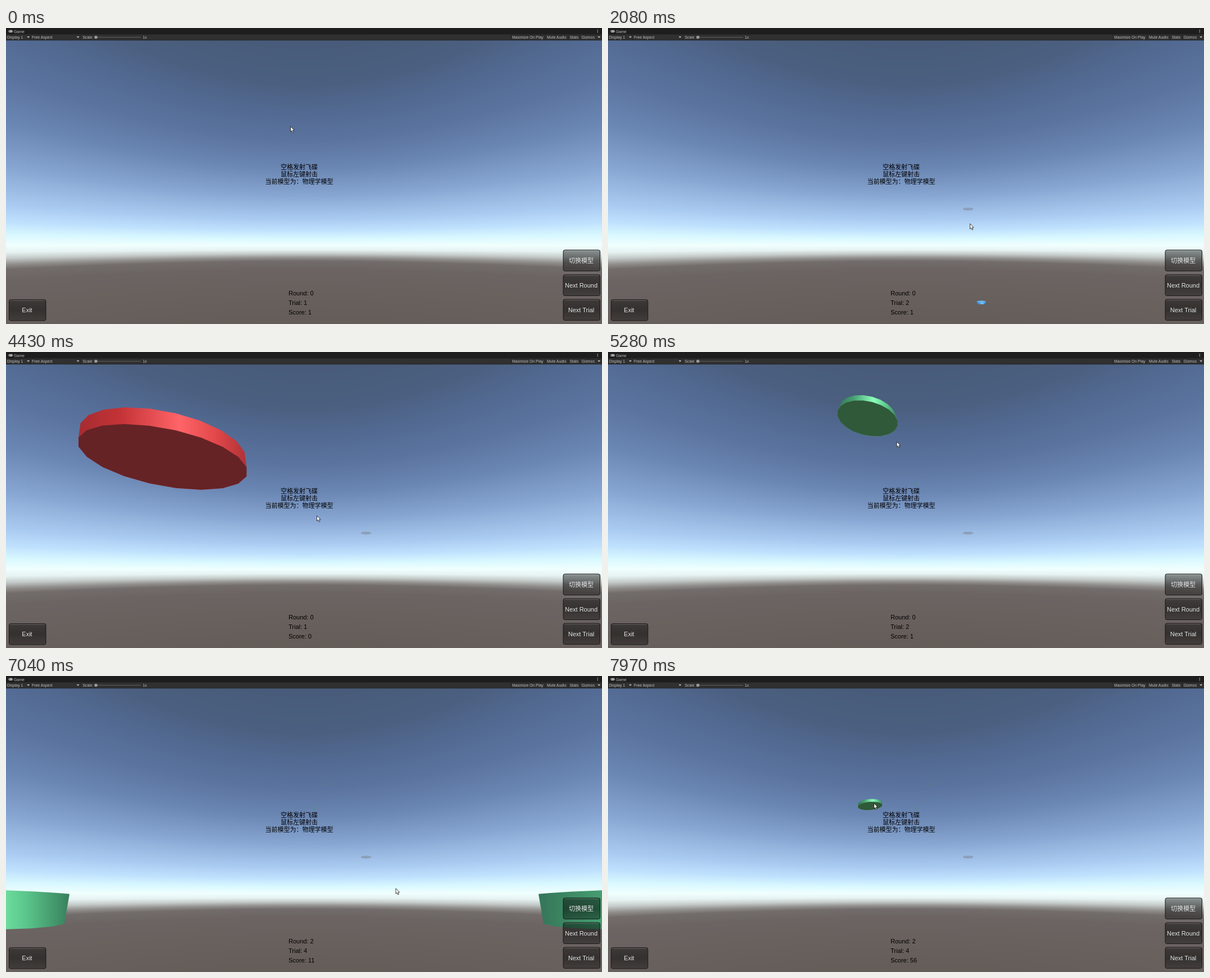
An HTML page with a canvas for the animation above (8000 ms loop, 1061 by 528 pixels).

```html
<!DOCTYPE html>
<html lang="zh">
<head>
<meta charset="utf-8">
<title>Game</title>
<style>
  html, body { margin: 0; width: 100%; height: 100%; overflow: hidden; background: #1e1e1e; }
  canvas, svg { position: absolute; left: 0; top: 0; display: block; }
  text { font-family: "Liberation Sans", "Noto Sans CJK SC", "Noto Sans CJK", sans-serif; font-size: 11px; white-space: pre; }
  .bar text { font-size: 6.9px; fill: #bdbdbd; }
  .mid { text-anchor: middle; }
  .btn text { text-anchor: middle; fill: #e4e6e6; }
</style>
</head>
<body>
<canvas id="sky" width="1061" height="528"></canvas>
<svg id="stage" width="1061" height="528" viewBox="0 0 1061 528">
  <defs>
    <linearGradient id="glass" x1="0" y1="0" x2="0" y2="1">
      <stop offset="0" stop-color="#000" stop-opacity=".42"/>
      <stop offset=".5" stop-color="#000" stop-opacity=".5"/>
      <stop offset="1" stop-color="#000" stop-opacity=".36"/>
    </linearGradient>
    <clipPath id="view"><rect y="22" width="1061" height="506"/></clipPath>
  </defs>
  <g id="marks">
    <ellipse id="smudge" cx="641" cy="323" rx="9.5" ry="2.6" fill="#8795ab" opacity=".75"/>
    <path id="fleck" d="M546.5 231h2.5v9h-2.5z" fill="#4f9478" opacity=".8"/>
    <path id="corner" d="M569 186v8M576 194h5" stroke="#468570" stroke-width="1.4" opacity=".75"/>
  </g>
  <g id="discs" clip-path="url(#view)"></g>
  <g id="help" class="mid">
    <text x="522" y="252">空格发射飞碟</text>
    <text x="522" y="265">鼠标左键射击</text>
    <text x="522" y="278">当前模型为：物理学模型</text>
  </g>
  <text id="round" x="503" y="477"></text>
  <text id="trial" x="503" y="494"></text>
  <text id="score" x="503" y="510.5"></text>
  <g id="buttons" class="btn"></g>
  <g class="bar">
    <rect width="1061" height="11" fill="#1e1e1e"/>
    <rect y="11" width="1061" height="11" fill="#303030"/>
    <path d="M0 11.2H1061M0 21.8H1061" stroke="#1b1b1b" stroke-width=".6"/>
    <rect x="4.5" y="3.8" width="7.5" height="4.2" rx="2.1" fill="#b8b8b8"/>
    <path d="M5.6 5.9h2M6.6 4.9v2M9.4 5.9h1.4" stroke="#1e1e1e" stroke-width=".6"/>
    <text x="14" y="8.6">Game</text>
    <path d="M1053.3 3v1.2M1053.3 5v1.2M1053.3 7v1.2" stroke="#c0c0c0" stroke-width="1.2"/>
    <text x="2" y="19">Display 1</text>
    <text x="46" y="19">Free Aspect</text>
    <text x="136.5" y="19">Scale</text>
    <text x="243.5" y="19">1x</text>
    <text x="901" y="19">Maximize On Play</text>
    <text x="963" y="19">Mute Audio</text>
    <text x="1003.5" y="19">Stats</text>
    <text x="1024.5" y="19">Gizmos</text>
    <path d="M160 16.5h80" stroke="#5f5f5f"/>
    <circle cx="160" cy="16.5" r="2.8" fill="#999"/>
    <path d="M37.2 15h5l-2.5 2.8zM125.7 15h5l-2.5 2.8zM1053.2 15h5l-2.5 2.8z" fill="#bdbdbd"/>
    <path d="M44 12v9.5M132.5 12v9.5M899 12v9.5M960 12v9.5M1001 12v9.5M1022 12v9.5" stroke="#222" stroke-width=".7"/>
  </g>
  <path id="cursor" d="M0 0V9.4L2.1 7.5L3.7 11L5.3 10.3L3.8 6.9H6.6Z" fill="#fff" stroke="#111" stroke-width=".8" stroke-linejoin="round"/>
</svg>
<script>
const LOOP = 8000, CX = 530.5, CY = 275, FOCAL = 438, HORIZON = 387;
const $ = id => document.getElementById(id);

function make(tag, attrs, parent) {
  const node = document.createElementNS("http://www.w3.org/2000/svg", tag);
  for (const k in attrs) node.setAttribute(k, attrs[k]);
  return parent.appendChild(node);
}

// Sky colour depends on the sine of the viewing elevation.
const SKY = [
  [-.3, 0x635b56], [-.089, 0x6b6462], [-.0594, 0x726c6a], [-.047, 0x918f8d], [-.0323, 0xc4cbc9],
  [-.0172, 0xe6f3f2], [0, 0xf0fffe], [.0262, 0xd8f8ff], [.059, 0xbfe0fd], [.103, 0xa9caf0],
  [.192, 0x89a7d3], [.303, 0x6a86b3], [.408, 0x5b749f], [.503, 0x526a92], [.589, 0x4b5f80], [.75, 0x465976]
];

function paintSky() {
  const ctx = $("sky").getContext("2d"), img = ctx.createImageData(1061, 528);
  const cos = FOCAL / Math.hypot(FOCAL, HORIZON - CY);
  for (let y = 22, p = 22 * 1061 * 4; y < 528; y++) {
    for (let x = 0; x < 1061; x++, p += 4) {
      const s = (HORIZON - y) * cos / Math.hypot(FOCAL, x - CX, y - CY);
      let i = 1;
      while (i < SKY.length - 1 && SKY[i][0] < s) i++;
      const [s0, c0] = SKY[i - 1], [s1, c1] = SKY[i], k = (s - s0) / (s1 - s0);
      for (let n = 0; n < 3; n++) {
        const a = c0 >> (16 - 8 * n) & 255, b = c1 >> (16 - 8 * n) & 255;
        img.data[p + n] = a + (b - a) * k;
      }
      img.data[p + 3] = 255;
    }
  }
  ctx.putImageData(img, 0, 0);
}

function addButton(x, y, label) {
  const g = make("g", {}, $("buttons"));
  const box = make("rect", { x: x + .5, y: y + .5, width: 65.5, height: 37.5, rx: 3, fill: "url(#glass)", stroke: "#191919", "stroke-width": 1 }, g);
  make("path", { d: `M${x + 3} ${y + 1.8}h60.5`, stroke: "#fff", "stroke-opacity": .22 }, g);
  make("text", { x: x + 32.5, y: y + 23 }, g).textContent = label;
  return box;
}
addButton(5, 484, "Exit");
addButton(991.5, 395.5, "切换模型");
const nextRound = addButton(991.5, 439.5, "Next Round");
addButton(991.5, 483.5, "Next Trial");

const PAINT = {
  blue: { rim: ["#3f78b8", "#4a92dc", "#86cbff", "#4f96dc", "#3a70ac"], face: "#2f4757", lid: "#63b6f2" },
  red: { rim: ["#a52c30", "#c43337", "#ff6468", "#e2474a", "#ae3236"], face: "#652326", lid: "#f05a5c" },
  green: { rim: ["#357558", "#459c70", "#8cffbc", "#5bc68b", "#38805c"], face: "#305939", lid: "#70dc9e" }
};
for (const name in PAINT) {
  const grad = make("linearGradient", { id: name }, document.querySelector("defs"));
  PAINT[name].rim.forEach((c, i) =>
    make("stop", { offset: [0, .25, .6, .82, 1][i], "stop-color": c }, grad));
}

// Polynomials in seconds: distance, sideways and vertical place, in disc radii.
const PATHS = {
  blue: { z: [.0115, .0713, -.0078], u: [-4.88, 10.55, 0], v: [.35, -27.5, 19.7], size: 1, thick: .39, flat: 1, tilt: .1 },
  red: { z: [.0115, .0264, -.0078], u: [-5.47, 4.1, 0], v: [.6, -13.6, 16.5], size: 2.67, thick: .18, flat: .8, tilt: .178 },
  green: { z: [.0079, .0883, -.0157], u: [-5, 10.7, 0], v: [1.05, -29.4, 26.6], size: 1.65, thick: .24, flat: 1, tilt: .29 }
};
const DISCS = [
  { kind: "blue", go: 30, end: 2215, side: 1 },
  { kind: "red", go: 4180, end: 4995, side: 1 },
  { kind: "green", go: 5010, end: 5800, side: 1 },
  { kind: "green", go: 5820, end: 6270, side: -1 },
  { kind: "green", go: 7050, lead: 25, end: 7600, side: 1 },
  { kind: "green", go: 7050, lead: 25, end: 8000, side: -1 }
];
for (const d of DISCS) {
  d.body = make("path", { fill: `url(#${d.kind})` }, $("discs"));
  d.face = make("path", {}, $("discs"));
}

const poly = (c, t) => c[0] + c[1] * t + c[2] * t * t;
const outline = pts => "M" + pts.map(p => p[0].toFixed(2) + " " + p[1].toFixed(2)).join("L") + "Z";

function ring(x, y, w, squash, shear) {
  return Array.from({ length: 20 }, (_, i) => {
    const a = (i + .5) * Math.PI / 10, c = Math.cos(a);
    return [x + w * c, y + w * (shear * c + squash * Math.sin(a))];
  });
}

function hull(pts) {
  const half = list => {
    const out = [];
    for (const p of list) {
      while (out.length > 1) {
        const [a, b] = out.slice(-2);
        if ((b[0] - a[0]) * (p[1] - a[1]) - (b[1] - a[1]) * (p[0] - a[0]) > 0) break;
        out.pop();
      }
      out.push(p);
    }
    return out.slice(0, -1);
  };
  const s = [...pts].sort((a, b) => a[0] - b[0] || a[1] - b[1]);
  return half(s).concat(half(s.reverse()));
}

function drawDisc(d, t) {
  const on = t >= d.go - (d.lead || 0) && t < d.end;
  d.body.style.display = d.face.style.display = on ? "" : "none";
  if (!on) return;
  const p = PATHS[d.kind], s = Math.max(0, t - d.go) / 1000;
  const unit = 1 / poly(p.z, s), w = unit * p.size;
  const x = CX + d.side * poly(p.u, s) * unit, y = CY + poly(p.v, s) * unit;
  const lean = yy => .0021 * (392 - yy) * p.flat;
  const e = Math.min(.9, Math.abs(lean(y)));
  const h = p.thick * w * Math.sqrt(1 - e * e), shear = d.side * p.tilt * Math.min(unit, 60) / 57 * Math.min(1, e * 3);
  const low = y + h / 2, high = y - h / 2;
  const bottom = ring(x, low, w, lean(low), shear);
  const top = ring(x, high, w * (1.05 - .2 * e), lean(high), shear);
  d.body.setAttribute("d", outline(hull(bottom.concat(top))));
  const under = lean(low) > 0, over = lean(high) < 0;
  d.face.setAttribute("d", under ? outline(bottom) : over ? outline(top) : "");
  d.face.setAttribute("fill", under ? PAINT[d.kind].face : PAINT[d.kind].lid);
}

const MOUSE = [
  [0, 506.5, 175.5], [1000, 506.5, 175.5], [1600, 644.5, 349], [2800, 644.5, 349], [2930, 550, 355],
  [3040, 432, 300], [3160, 553.5, 292], [4850, 553.5, 292], [4970, 530, 270], [5280, 514, 160],
  [5560, 540, 140], [5790, 584, 186], [6270, 532, 125], [6580, 1024, 456], [6890, 1024, 456],
  [7040, 694, 379], [7600, 556, 150], [7970, 473.5, 227], [8000, 473.5, 227]
];
const COUNTS = {
  round: [[0, 0], [6630, 1], [6690, 2]],
  trial: [[0, 1], [30, 2], [2380, 0], [4180, 1], [5010, 2], [5820, 3], [7025, 4]],
  score: [[0, 1], [2380, 0], [5000, 1], [5800, 6], [6270, 11], [7600, 56]]
};

function mouseAt(t) {
  const i = MOUSE.findIndex(m => m[0] > t), a = MOUSE[i - 1], b = MOUSE[i];
  const k = (t - a[0]) / (b[0] - a[0]), e = k * k * (3 - 2 * k);
  return [a[1] + (b[1] - a[1]) * e, a[2] + (b[2] - a[2]) * e];
}

const show = (id, on) => $(id).style.display = on ? "" : "none";

function draw(t) {
  DISCS.forEach(d => drawDisc(d, t));
  for (const id in COUNTS) {
    const value = COUNTS[id].filter(c => c[0] <= t).pop()[1];
    $(id).textContent = id[0].toUpperCase() + id.slice(1) + ": " + value;
  }
  show("help", t < 2380 || t >= 3890);
  show("smudge", t >= 1640);
  show("fleck", t >= 5000);
  show("corner", t >= 5800);
  nextRound.setAttribute("stroke", t >= 6570 && t < 6910 ? "#3a3a3a" : "#191919");
  $("cursor").setAttribute("transform", `translate(${mouseAt(t)})`);
}

paintSky();
const start = performance.now();
function tick() {
  draw((performance.now() - start) % LOOP);
  requestAnimationFrame(tick);
}
tick();
</script>
</body>
</html>
```
